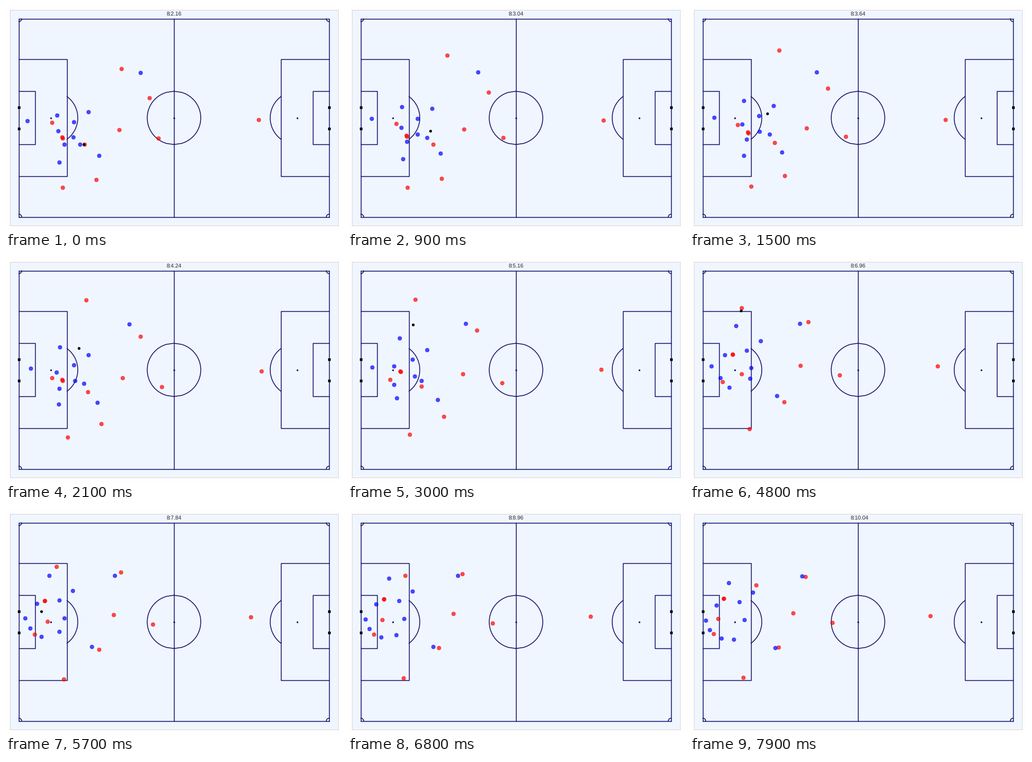
Animation, 600 px wide and 400 px high, one loop 8 s. Source, as a matplotlib script:

```python
import numpy as np
import matplotlib.pyplot as plt
from matplotlib.animation import FuncAnimation

plt.rcParams.update({"font.family": "Liberation Sans", "text.hinting": "none"})
LINE, GRASS, PAPER = "#120e6a", "#f0f6ff", "#fffdfd"
YARD = 0.9144
HALF_L, HALF_W = 53, 34
FRAMES, STEP = 80, 100
END = (FRAMES - 1) * STEP

fig = plt.figure(figsize=(12, 8), dpi=50, facecolor=PAPER)
ax = fig.add_axes([7.4 / 600, 7.8 / 400, 585.2 / 600, 384.8 / 400], facecolor=GRASS)
ax.set(xlim=(-56, 56), ylim=(-37, 37), xticks=[], yticks=[])
for spine in ax.spines.values():
    spine.set(color="0.8", linewidth=1)


def line(x, y):
    ax.plot(x, y, color=LINE, linewidth=2.1)


def spot(x):
    ax.scatter(x, 0, s=20, color=LINE, linewidth=0, zorder=2)


def draw_pitch():
    unit = np.linspace(-1, 1, 50)
    line([0, 0], [-HALF_W, HALF_W])
    spot(0)
    radius = 10 * YARD
    bow = radius * np.sqrt(1 - unit**2)
    for s in (1, -1):
        end = s * HALF_L
        line(s * bow, radius * unit)
        line([-HALF_L, HALF_L], [s * HALF_W] * 2)
        line([end, end], [-HALF_W, HALF_W])
        for depth, width in ((6, 20), (18, 44)):
            x, y = end - s * depth * YARD, width * YARD / 2
            line([end, x, x, end], [y, y, -y, -y])
        spot(end - s * 12 * YARD)
        ax.plot([end, end], [-4 * YARD, 4 * YARD], "ks", markersize=6)
        corner = np.linspace(0, 1, 50) * YARD
        x = end - s * np.sqrt(YARD**2 - corner**2)
        line(x, corner - HALF_W)
        line(x, HALF_W - corner)
        y = 8 * YARD * unit
        line(end - s * (np.sqrt(radius**2 - y**2) + 12 * YARD), y)


draw_pitch()
clock = ax.text(-2.5, HALF_W + 1, "", fontsize=14, color="0.15")

# Overlay in pixels for players and ball; positions name pixel centres
stage = fig.add_axes([0, 0, 1, 1])
stage.set(xlim=(0.5, 600.5), ylim=(400.3, 0.3))
stage.axis("off")

# How far each team bends off the straight run while the ball goes wide
TEAM_SWAY = {"r": (12, 3), "b": (10, -6)}
players = []


def player(color, start, end, sway=None):
    dot, = stage.plot([], [], color + "o", markersize=10, alpha=0.7)
    bend = sway or TEAM_SWAY[color]
    players.append((dot, *(np.array(p, float) for p in (start, end, bend))))


player("r", (206, 112), (118, 134), sway=(-46, -48))
player("r", (256, 164), (206, 119), sway=(-3, -14))
player("r", (82, 208), (42, 221))
player("r", (100, 234), (60, 158))
player("r", (101, 236), (60, 158))
player("r", (140, 247), (50, 194), sway=(33, 6))
player("r", (202, 221), (184, 184))
player("r", (272, 236), (254, 201))
player("r", (161, 310), (158, 245))
player("r", (101, 324), (95, 299))
player("r", (451, 203), (429, 189))

player("b", (240, 119), (200, 118), sway=(-11, -1))
player("b", (38, 205), (28, 197))
player("b", (91, 195), (69, 130), sway=(12, -22))
player("b", (147, 189), (112, 147))
player("b", (121, 207), (88, 164))
player("b", (93, 223), (47, 170))
player("b", (120, 234), (97, 196))
player("b", (104, 247), (35, 214))
player("b", (132, 247), (78, 231), sway=(24, -21))
player("b", (166, 267), (152, 246), sway=(1, -4))
player("b", (95, 279), (56, 229))

# Touches of the ball: time, x, y
TOUCHES = [(0, 139, 247.5), (600, 152, 239), (2100, 130, 161), (3900, 103, 77.5),
           (5250, 86, 102), (5900, 54, 217), (6300, 21.5, 224)]
BALL_OUT = 6400
ball, = stage.plot([], [], "ko", markersize=6)


def update(i):
    t = i * STEP
    u = min(t / 6400, 1)
    ease = u * u * (3 - 2 * u)
    swing = np.sin(np.pi * (t / END) ** 0.8)
    for dot, start, end, bend in players:
        x, y = start + (end - start) * ease + bend * swing
        dot.set_data([x], [y])
    when, bx, by = zip(*TOUCHES)
    ball.set_data([np.interp(t, when, bx)], [np.interp(t, when, by)])
    ball.set_visible(t < BALL_OUT)
    # Tracking samples come every 0.04 s
    clock.set_text(f"8:{2.16 + 0.04 * (5 * i // 2):.2f}")
    return [p[0] for p in players] + [ball, clock]


anim = FuncAnimation(fig, update, frames=FRAMES, interval=STEP, repeat=True, repeat_delay=0)
plt.show()
```
